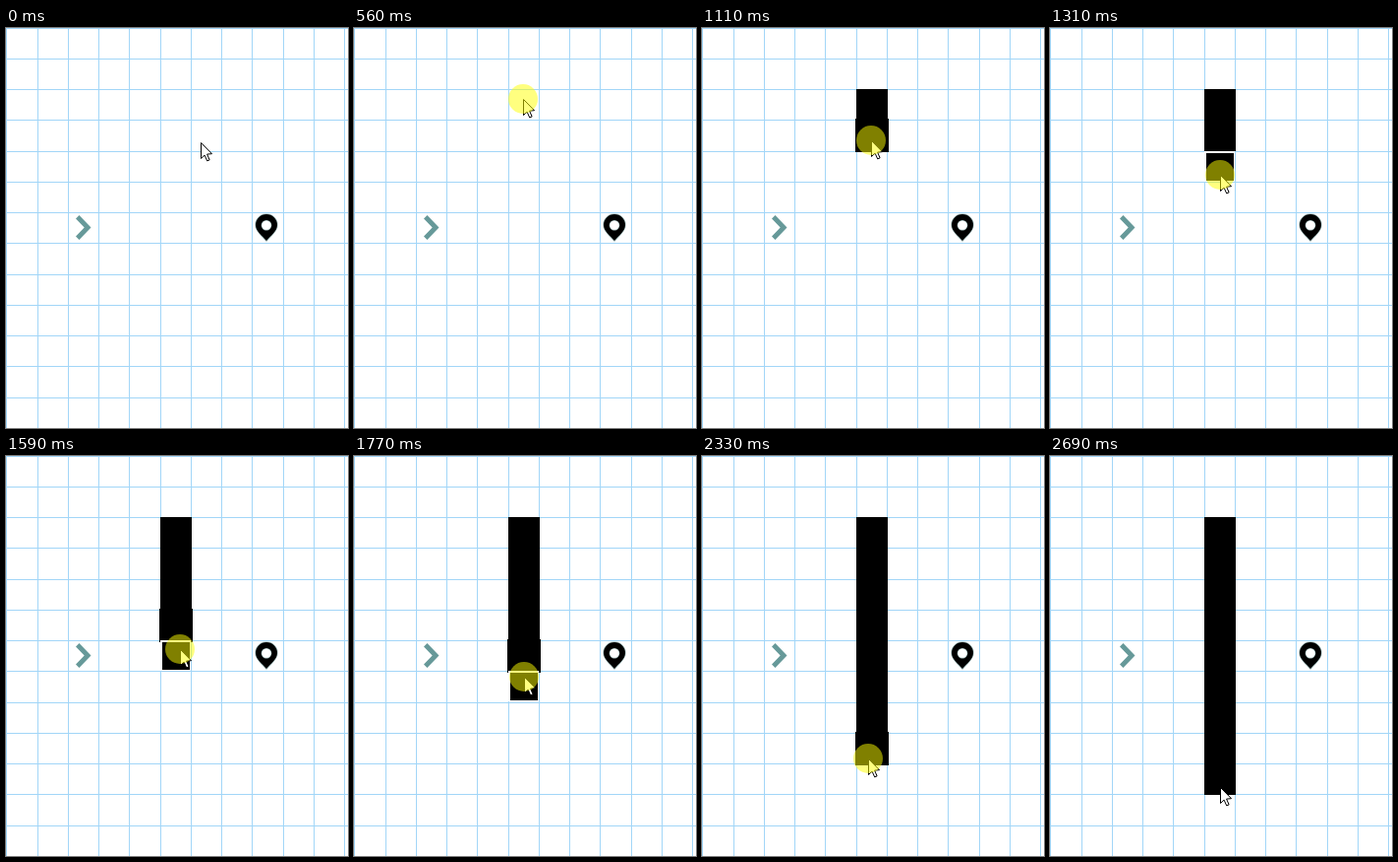
Recreate the animation shown at these times as an HTML page with a canvas. Size 348 px wide and 406 px high, loop 2.97 s.

```html
<!DOCTYPE html>
<html lang="en">
<head>
<meta charset="utf-8">
<title>Drawing a wall</title>
<style>
  html, body { margin: 0; width: 100%; height: 100%; overflow: hidden; background: #fff; }
  canvas { display: block; }
</style>
</head>
<body>
<canvas id="stage" width="348" height="406"></canvas>
<script>
const ctx = document.getElementById('stage').getContext('2d');
const LOOP = 2970, TICK = 93.2, LAST_TICK = 29;
const CELL = 31.25, FIRST_ROW = 2, LAST_ROW = 10, WALL_X = 157;
const PRESS = 6;

const gridX = i => Math.floor(0.75 + i * CELL);
const gridY = i => Math.floor(i * CELL);

// Key points of the pointer, with time in ticks.
const path = [
  { t: 0, x: 198, y: 116 }, { t: 5, x: 172, y: 72 }, { t: 7, x: 172, y: 72 },
  { t: 10, x: 172, y: 93 }, { t: 12, x: 172, y: 114 }, { t: 14, x: 173, y: 149 },
  { t: 17, x: 177, y: 196 }, { t: 22, x: 168, y: 266 }, { t: 24, x: 167, y: 293 },
  { t: 26, x: 170, y: 320 }, { t: 28, x: 173, y: 336 }
];

// Reads one property of the path where another has the given value.
function lookup(keys, from, value, to) {
  const i = keys.findIndex(key => key[from] > value);
  if (i < 0) return keys[keys.length - 1][to];
  const a = keys[i - 1], b = keys[i];
  return a[to] + (b[to] - a[to]) * (value - a[from]) / (b[from] - a[from]);
}

// A cell is filled as the pressed pointer enters it.
const drag = path.filter(key => key.t > PRESS);
const birthOf = row =>
  row === FIRST_ROW ? PRESS : lookup(drag, 'y', row * CELL, 't');

function cellSize(age) {
  if (age < 1.5) return 28;
  return age < 3.4 ? 34 : 32;
}

function polygon(points, x, y) {
  ctx.beginPath();
  points.forEach(([px, py]) => ctx.lineTo(x + px, y + py));
  ctx.closePath();
}

function drawGrid() {
  ctx.fillStyle = '#fff';
  ctx.fillRect(0, 0, 348, 406);
  ctx.fillStyle = '#a2d6f8';
  for (let i = 0; i < 12; i++) ctx.fillRect(gridX(i), 0, 1, 406);
  for (let i = 0; i < 13; i++) ctx.fillRect(0, gridY(i), 348, 1);
}

function drawMarkers() {
  ctx.fillStyle = '#669999';
  polygon([[0, 3.5], [3.5, 0], [15.5, 12.5], [3.5, 25], [0, 21.5], [8.7, 12.5]], 71, 190);
  ctx.fill();

  ctx.beginPath();
  ctx.moveTo(265, 216);
  ctx.bezierCurveTo(261, 211, 254, 206.5, 254, 200);
  ctx.arc(265, 200, 11, Math.PI, 0);
  ctx.bezierCurveTo(276, 206.5, 269, 211, 265, 216);
  ctx.closePath();
  ctx.moveTo(270.3, 200.3);
  ctx.arc(265, 200.3, 5.3, 0, Math.PI * 2);
  ctx.strokeStyle = 'rgba(102,153,153,.5)';
  ctx.lineWidth = 1.5;
  ctx.stroke();
  ctx.fillStyle = '#000';
  ctx.fill('evenodd');
}

function drawWall(t) {
  for (let row = FIRST_ROW; row <= LAST_ROW; row++) {
    const age = t - birthOf(row);
    if (age <= 0) return;
    const top = gridY(row), size = cellSize(age), inset = (32 - size) / 2;
    ctx.fillStyle = '#fff';
    if (inset > 0) ctx.fillRect(WALL_X, top, 31, 31);
    ctx.fillStyle = '#000';
    ctx.fillRect(WALL_X + inset, top + inset, size, size);
  }
}

function drawPointer(t) {
  const x = Math.round(lookup(path, 't', t, 'x'));
  const y = Math.round(lookup(path, 't', t, 'y'));
  polygon([[0, 0], [0, 16], [3.6, 12.6], [6.2, 18.4], [8.6, 17.4], [6.1, 11.6], [11, 11.2]],
    x + 0.5, y + 0.5);
  ctx.fillStyle = '#fff';
  ctx.fill();
  ctx.strokeStyle = '#000';
  ctx.lineWidth = 1;
  ctx.stroke();

  if (t < PRESS || t >= LAST_TICK) return;
  ctx.fillStyle = 'rgba(255,255,0,.5)';
  ctx.beginPath();
  ctx.arc(x, y, 15, 0, Math.PI * 2);
  ctx.fill();
}

function render() {
  const now = performance.now() % LOOP;
  const t = Math.min(LAST_TICK, Math.floor((now + 14) / TICK));
  drawGrid();
  drawMarkers();
  drawWall(t);
  drawPointer(t);
  requestAnimationFrame(render);
}
render();
</script>
</body>
</html>
```
